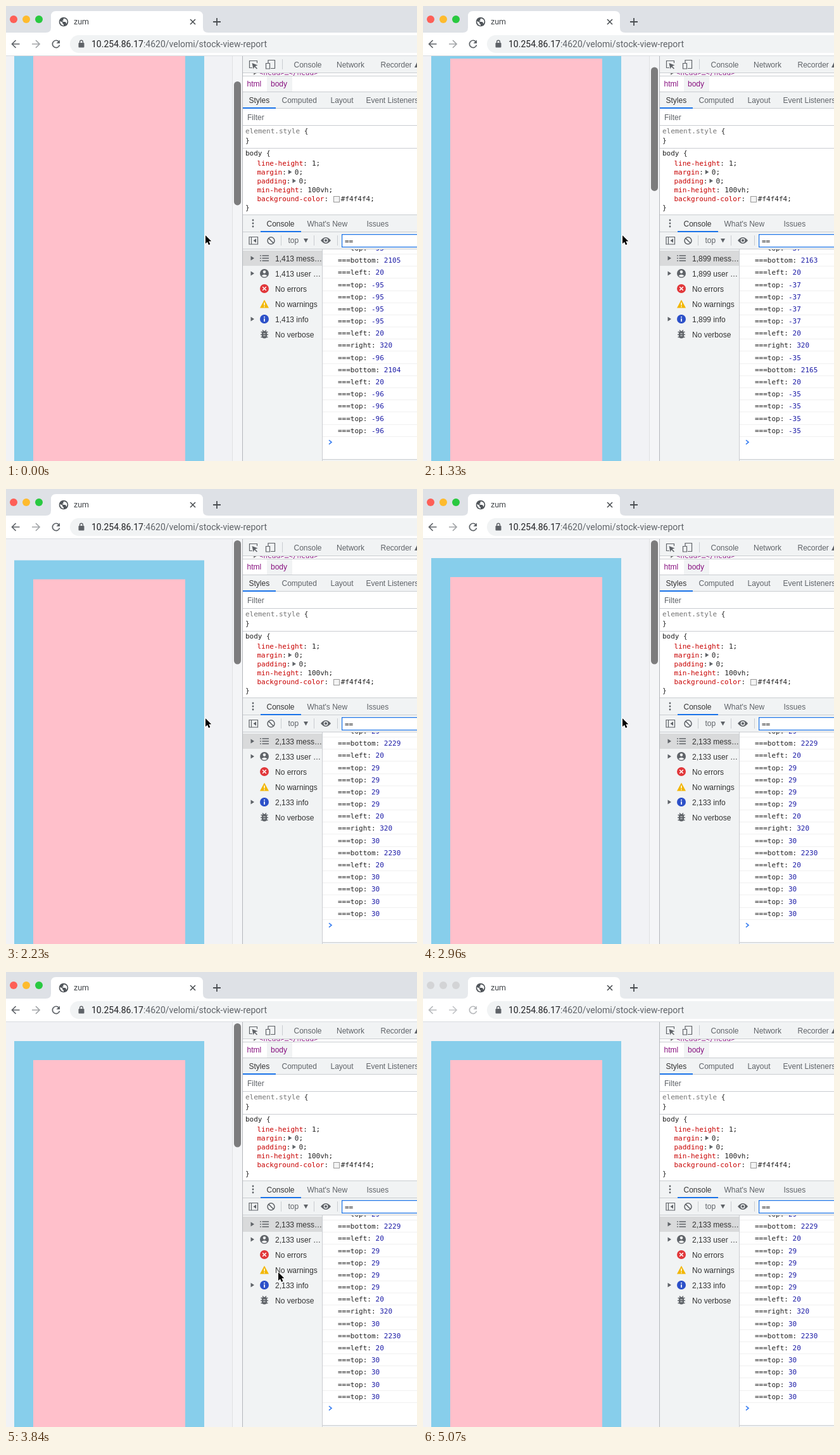
Write an HTML page with a canvas that moves like this. It is 649x718 px and loops after 5.17 s.

```html
<!DOCTYPE html>
<html lang="en">
<head>
<meta charset="utf-8">
<title>Scroll log</title>
<style>
html, body { margin: 0; width: 100%; height: 100%; overflow: hidden; background: #fff; }
canvas { display: block; }
</style>
</head>
<body>
<canvas id="stage" width="649" height="718"></canvas>
<script>
const ctx = document.getElementById('stage').getContext('2d');
const LOOP = 5170;
const SANS = '12px "Liberation Sans", sans-serif';
const MONO = '11px "DejaVu Sans Mono", monospace';
const UI = '14px Roboto, sans-serif';
const PANEL = '#f1f3f4', LINE = '#cacdd1', ICON = '#5f6368', BLUE = '#1a73e8';

const STEPS = [0, 150, 300, 450, 600, 740, 890, 1040, 1180, 1330, 1480, 1630, 1780, 1930, 2080, 2230,
  2380, 2530, 2680, 2820, 2970, 3110, 3260, 3400, 3550, 3690, 3840, 3990, 4130, 4270, 4420, 4570, 5070];
// Per step, the last value holds: painted box top, logged top, previous logged top, scroll events.
const BOX_TOP = [-108, -118, -123, -122, -116, -105, -89, -69, -47, -26, -5, 12, 24, 32, 35, 33.5, 32, 31, 30];
const LOG_TOP = [-96, -110, -120, -124, -121, -110, -95, -75, -55, -35, -17, -2, 12, 22, 28, 30];
const PREV_TOP = [-95, -108, -119, -124, -122, -113, -97, -78, -58, -37, -19, -4, 10, 21, 27, 29];
const EVENTS = [0, 5, 9, 13, 17, 22, 30, 38, 46, 54, 61, 68, 73, 77, 79, 80];
// Pointer positions from step 20 on.
const POINTER = [[315, 362], [315, 362], [315, 362], [316, 362], [322, 364], [358, 402], [430, 474],
  [525, 560], [575, 640], [592, 687], [600, 706]];
const THUMB_FADE = { 28: .9, 29: .55, 30: .2, 31: 0, 32: 0 };

const hold = (values, i) => values[Math.min(i, values.length - 1)];

function rect(x, y, w, h, color) {
  ctx.fillStyle = color;
  ctx.fillRect(x, y, w, h);
}
function round(x, y, w, h, r, color) {
  ctx.fillStyle = color;
  ctx.beginPath();
  ctx.roundRect(x, y, w, h, r);
  ctx.fill();
}
function disc(x, y, r, color) {
  ctx.fillStyle = color;
  ctx.beginPath();
  ctx.arc(x, y, r, 0, 7);
  ctx.fill();
}
function poly(points, color) {
  ctx.fillStyle = color;
  ctx.beginPath();
  points.forEach(([x, y]) => ctx.lineTo(x, y));
  ctx.closePath();
  ctx.fill();
}
function stroke(path, color, width = 1.5) {
  ctx.strokeStyle = color;
  ctx.lineWidth = width;
  ctx.stroke(new Path2D(path));
}
function text(string, x, y, color = '#333', font = SANS) {
  ctx.font = font;
  ctx.fillStyle = color;
  ctx.fillText(string, x, y);
}
const mono = (string, x, y, color = '#222') => text(string, x, y, color, MONO);
const rule = (y, x = 374) => rect(x, y, 649 - x, 1, LINE);
const arrowRight = (x, y, color = ICON) => poly([[x, y - 3.5], [x + 5.5, y], [x, y + 3.5]], color);

function drawBrowser(active) {
  const strip = active ? '#dee1e6' : '#e7eaed';
  const nav = active ? ICON : '#b7b9bc';
  rect(0, 0, 649, 42, strip);
  const lights = active ? ['#fe5f57', '#febb2e', '#29c940'] : ['#d3d4d6', '#d3d4d6', '#d3d4d6'];
  lights.forEach((color, i) => disc(12 + 20 * i, 21, 6, color));

  ctx.fillStyle = '#fff';
  ctx.fill(new Path2D('M63 42Q71 42 71 34V16Q71 8 79 8H303Q311 8 311 16V34Q311 42 319 42Z'));
  disc(91, 25, 7.3, '#50555a');
  ctx.fillStyle = '#fff';
  ctx.fill(new Path2D('M85 24L89 25.5L89.5 28L91 29V31Q86 30 85 24ZM92 19.5L90 21L91 22.5L88.5 23.5L91 25H94L95.5 28Q98 24 95 21Z'));
  text('zum', 107, 29, '#45494d', '12.5px Roboto, sans-serif');
  stroke('M291 21l8 8m0 -8l-8 8', '#4a4e52', 1.6);
  stroke('M327 25h12m-6 -6v12', '#4a4e52', 1.8);

  rect(0, 42, 649, 36, '#fff');
  rect(0, 78, 649, 1, '#d9dce0');
  stroke('M21.5 60H9.5m6 -6l-6 6l6 6', nav, 1.7);
  stroke('M41 60H53m-6 -6l6 6l-6 6', active ? '#a2a5a8' : '#c3c5c8', 1.7);
  stroke('M83.4 56.2A5.7 5.7 0 1 0 84.6 61.5', nav, 1.7);
  poly([[85, 53.5], [85, 59], [79.5, 59]], nav);
  round(101, 46, 570, 28, 14, PANEL);
  round(114.5, 58, 9, 7.5, 1, ICON);
  stroke('M116.6 58.5V56.6a2.4 2.4 0 0 1 4.8 0V58.5', ICON, 1.4);
  text('10.254.86.17', 135, 65, '#202124', UI);
  const hostWidth = ctx.measureText('10.254.86.17').width;
  text(':4620/velomi/stock-view-report', 135 + hostWidth, 65, ICON, UI);
}

function drawPage(step) {
  const top = hold(BOX_TOP, step);
  const fade = THUMB_FADE[step] ?? 1;
  ctx.save();
  ctx.beginPath();
  ctx.rect(0, 79, 373, 639);
  ctx.clip();
  rect(0, 79, 373, 639, '#f1f2f5');
  rect(13, 79 + top, 300, 2200, '#87ceeb');
  rect(43, 109 + top, 240, 2140, '#ffc0cb');
  ctx.globalAlpha = fade;
  rect(357, 79, 16, 639, '#f4f5f7');
  rect(357, 79, 1, 639, '#dfe0e2');
  const scroll = Math.max(0, 30 - top);
  round(360, 81 + .275 * scroll, 11, 195.5, 5.5, '#7c7c7d');
  ctx.restore();
}

function drawInspector() {
  rect(373, 79, 276, 639, '#fff');
  rect(374, 79, 275, 26, PANEL);
  stroke('M389 97.5H384.5V86.5H396.5V90', ICON, 1.2);
  poly([[388.5, 90], [397.5, 93.5], [393.5, 95], [397, 98.5], [395.8, 99.5], [392.3, 96], [390.5, 99.5]], ICON);
  stroke('M414 90V85.5H424.5V98.5H418M410.5 90.5H416.5V99H410.5Z', ICON, 1.2);
  rect(436, 84, 1, 16, LINE);
  text('Console', 454.5, 96.5, ICON);
  text('Network', 522, 96.5, ICON);
  text('Recorder', 591.5, 96.5, ICON);
  poly([[645, 97], [649, 89], [649, 97]], ICON);
  rule(105);

  ctx.save();
  ctx.beginPath();
  ctx.rect(374, 106, 275, 4);
  ctx.clip();
  arrowRight(391, 105.5, '#777');
  mono('<head>…</head>', 400, 109, '#881280');
  ctx.restore();
  rule(110);
  rect(412, 111, 40, 24, PANEL);
  text('html', 380.5, 127, '#881280');
  text('body', 418, 127, '#881280');
  rule(135);

  rect(374, 136, 275, 26, PANEL);
  text('Styles', 383.5, 152.5);
  text('Computed', 435.5, 152.5, ICON);
  text('Layout', 512.5, 152.5, ICON);
  text('Event Listeners', 568.5, 152.5, ICON);
  rule(161);
  rect(374, 160, 52, 2, BLUE);
  text('Filter', 381, 179.5, ICON);
  rule(188);

  mono('element.style', 378, 201, '#757575');
  mono('{', 470.7, 201);
  mono('}', 378, 216);
  rule(224);
  mono('body {', 378, 236);
  const declarations = [['line-height', '1;'], ['margin', '0;', 1], ['padding', '0;', 1],
    ['min-height', '100vh;'], ['background-color', '']];
  declarations.forEach(([name, value, expandable], i) => {
    const y = 252 + 14 * i;
    const end = 396.5 + 6.62 * (name.length + 1);
    mono(name, 396.5, y, '#c80000');
    mono(':', end - 6.62, y);
    if (expandable) arrowRight(end + 3, y - 4);
    mono(value, end + (expandable ? 13 : 7), y);
  });
  ctx.strokeStyle = '#999';
  ctx.lineWidth = 1;
  rect(517, 300, 9, 9, '#f4f4f4');
  ctx.strokeRect(517.5, 300.5, 9, 9);
  mono('#f4f4f4;', 528.8, 308);
  mono('}', 378, 322);
}

function drawConsoleFrame() {
  rule(329);
  rect(374, 330, 275, 54, PANEL);
  [338, 343, 348].forEach(y => disc(390, y, 1.4, ICON));
  text('Console', 411.5, 347.5);
  text("What's New", 475.5, 347.5, ICON);
  text('Issues', 569.5, 347.5, ICON);
  rule(356);
  rect(402, 355, 64, 2, BLUE);

  stroke('M384 364.5H397.5V376H384ZM387.5 364.5V376', ICON, 1.2);
  poly([[395, 367], [395, 373.5], [390.5, 370.2]], ICON);
  stroke('M424 370.3a5.5 5.5 0 1 0 -11 0a5.5 5.5 0 1 0 11 0M414.6 366.4l7.8 7.8', ICON, 1.5);
  [434, 486, 523].forEach(x => rect(x, 362, 1, 16, LINE));
  text('top', 445.5, 374, ICON);
  poly([[470, 367], [477, 367], [473.5, 373.5]], ICON);
  ctx.fillStyle = ICON;
  ctx.fill(new Path2D('M497 370Q505 360 513 370Q505 380 497 370Z'));
  disc(505, 370, 3.4, PANEL);
  disc(505, 370, 2.1, ICON);
  rect(530, 360, 119, 21, BLUE);
  rect(531.2, 361.2, 118, 18.6, '#fff');
  mono('==', 535, 375);
  rule(383);
}

function drawSidebar(count) {
  const total = count.toLocaleString('en-US');
  rect(374, 384, 125, 334, PANEL);
  rect(374, 386, 125, 24, '#d9dadb');
  rect(499, 384, 1, 334, LINE);
  [398, 422, 494].forEach(y => arrowRight(386.5, y));
  const labels = [total + ' mess…', total + ' user …', 'No errors', 'No warnings', total + ' info', 'No verbose'];
  labels.forEach((label, i) => text(label, 425, 402.5 + 24 * i));

  stroke('M404.5 394H415M404.5 398H415M404.5 402H415M401 394h1.8M401 398h1.8M401 402h1.8', ICON, 1.4);
  disc(408, 422, 7, ICON);
  disc(408, 419.6, 2.3, PANEL);
  ctx.fillStyle = PANEL;
  ctx.fill(new Path2D('M403.5 425.8Q408 421.6 412.5 425.8Q408 429.5 403.5 425.8Z'));
  disc(408, 446, 7, '#e1373a');
  stroke('M405.2 443.2l5.6 5.6m0 -5.6l-5.6 5.6', '#fff', 1.6);
  poly([[408, 463.5], [415, 476.5], [401, 476.5]], '#f2b600');
  stroke('M408 468V472.5M408 473.7V475.2', '#fff', 1.5);
  disc(408, 494, 7, '#2c50c8');
  stroke('M408 490V491.7M408 493V498', '#fff', 1.7);
  stroke('M402.5 514.5H413.5M402 518.5H414M402.5 522.5H413.5M405 511.5l2 2M411 511.5l-2 2', ICON, 1.4);
  round(404, 513, 8, 11.5, 4, ICON);
  stroke('M406.3 517H409.7M406.3 520.3H409.7', PANEL, 1.1);
}

function drawLog(top, previous) {
  const block = value => [['top', value], ['bottom', value + 2200], ['left', 20],
    ...Array(4).fill(['top', value])];
  const rows = [...block(previous), ['left', 20], ['right', 320], ...block(top)];
  ctx.save();
  ctx.beginPath();
  ctx.rect(500, 384, 149, 334);
  ctx.clip();
  rows.forEach(([name, value], i) => {
    const y = 386 + 19.18 * i;
    const prefix = `===${name}: `;
    mono(prefix, 524, y);
    mono(value, 524 + 6.62 * prefix.length, y, '#1a1aa6');
    rect(500, Math.round(y + 5), 149, 1, '#f0f0f0');
  });
  stroke('M510 685l4 3.3l-4 3.3', '#367cf1', 1.6);
  rect(500, 715, 149, 3, PANEL);
  rect(500, 715, 149, 1, LINE);
  ctx.restore();
}

function drawPointer(step) {
  if (step > 30) return;
  const [x, y] = POINTER[Math.max(0, step - 20)];
  ctx.save();
  ctx.translate(x, y);
  if (x > 500) {
    const beam = 'M-3.5 -7.5Q0 -7.5 0 -5V5Q0 7.5 -3.5 7.5M3.5 -7.5Q0 -7.5 0 -5V5Q0 7.5 3.5 7.5M-2 2.5H2';
    stroke(beam, '#fff', 2.6);
    stroke(beam, '#111', 1.2);
  } else {
    const arrow = 'M0 0V13L3 10.2L5 15L7.4 14L5.3 9.3H9.3Z';
    ctx.lineJoin = 'round';
    stroke(arrow, '#fff', 2);
    ctx.fillStyle = '#000';
    ctx.fill(new Path2D(arrow));
  }
  ctx.restore();
}

function draw(now) {
  const time = now % LOOP;
  const step = STEPS.findLastIndex(start => start <= time);
  drawPage(step);
  drawBrowser(step < 32);
  drawInspector();
  rect(373, 79, 1, 639, '#b4b7bb');
  drawConsoleFrame();
  drawSidebar(1413 + 9 * hold(EVENTS, step));
  drawLog(hold(LOG_TOP, step), hold(PREV_TOP, step));
  drawPointer(step);
}

const start = performance.now();
function tick() {
  draw(performance.now() - start);
  requestAnimationFrame(tick);
}
tick();
</script>
</body>
</html>
```
